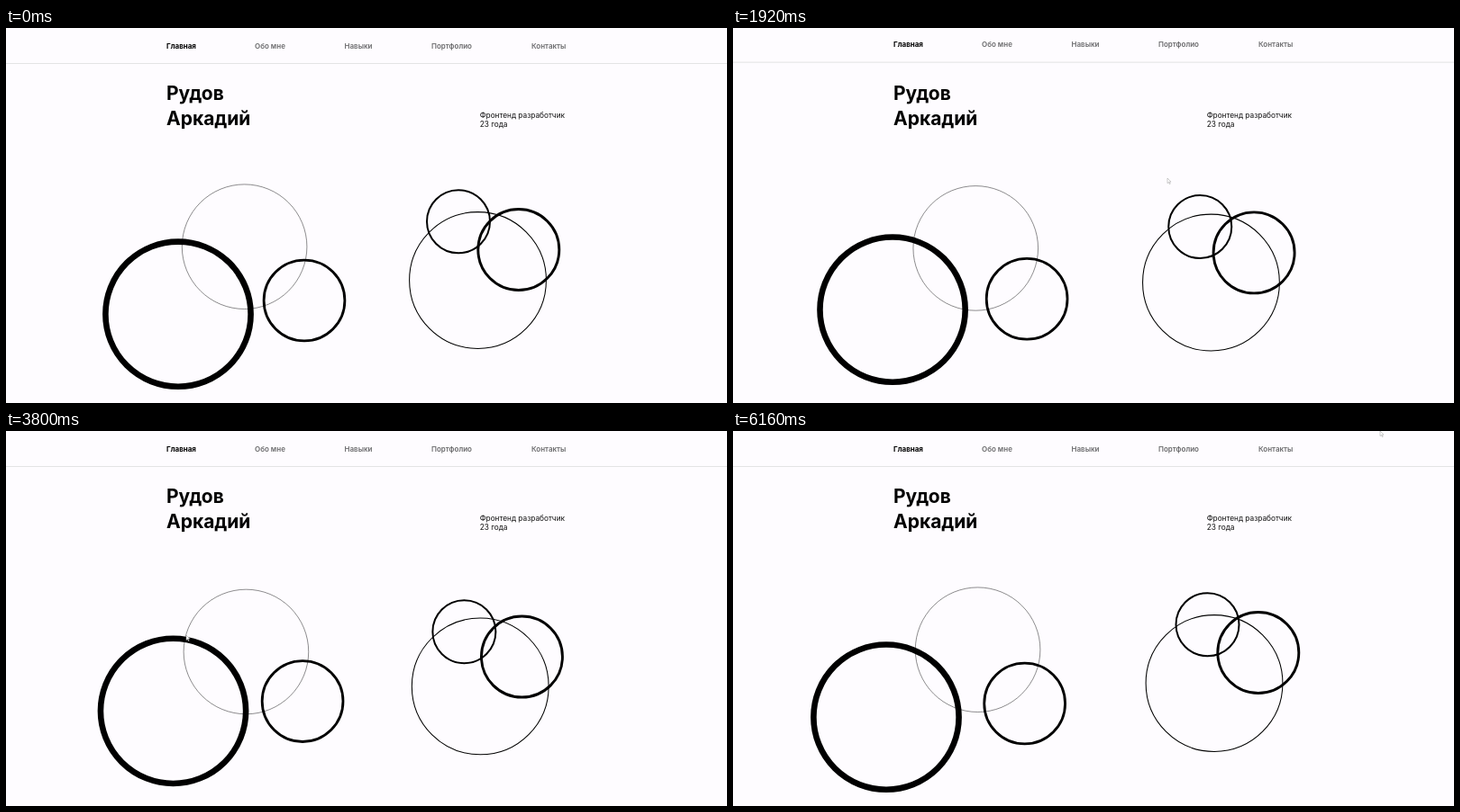
These frames come from a looping animation (800 by 417 pixels, 7.04 s). An HTML page:

```html
<!DOCTYPE html>
<html lang="ru">
<head>
<meta charset="utf-8">
<title>Портфолио</title>
<style>
  html, body { margin: 0; width: 100%; height: 100%; overflow: hidden; background: #fefcff; }
  svg { display: block; width: 100vw; height: 100vh; }
  text { font-family: Inter, "Open Sans", sans-serif; }
  .nav { font-size: 8px; font-weight: 600; fill: #6b6b6d; }
  .nav .active { font-weight: 700; fill: #000; }
  .name { font-size: 21px; font-weight: 700; }
  .role { font-size: 8.3px; fill: #111; }
  circle { fill: none; stroke: #000; }
</style>
</head>
<body>
<svg viewBox="0 0 800 417">
  <g id="header">
    <g class="nav">
      <text class="active" x="178" y="22.7">Главная</text>
      <text x="276" y="22.7">Обо мне</text>
      <text x="375.5" y="22.7">Навыки</text>
      <text x="472" y="22.7">Портфолио</text>
      <text x="583" y="22.7">Контакты</text>
    </g>
    <path id="rule" d="M0 39.5H800"/>
  </g>
  <g id="intro">
    <g class="name">
      <text x="178" y="79.5">Рудов</text>
      <text x="178" y="107.5">Аркадий</text>
    </g>
    <g class="role">
      <text x="525.7" y="100.2">Фронтенд разработчик</text>
      <text x="525.7" y="110.4">23 года</text>
    </g>
  </g>
  <!-- data-depth: how far a ring follows the pointer -->
  <g id="rings">
    <circle cx="264.6" cy="243.2" r="69.3" stroke-width=".45" data-depth=".01"/>
    <circle cx="191" cy="318.2" r="80.6" stroke-width="6.6" data-depth="-.03"/>
    <circle cx="331" cy="303" r="44.9" stroke-width="2.8" data-depth="-.0105"/>
    <circle cx="523.5" cy="280.5" r="75.9" stroke-width="1.05" data-depth=".015"/>
    <circle cx="502" cy="215.2" r="35" stroke-width="2" data-depth=".035"/>
    <circle cx="568.8" cy="246.5" r="45" stroke-width="2.9" data-depth=".02"/>
  </g>
  <path id="cursor" d="M0 0V5.6L1.4 4.4L2.4 6.6L3.2 6.2L2.2 4.1H4Z" fill="#fff" stroke="#999" stroke-width=".5"/>
</svg>
<script>
const LOOP = 7040, STEP = 40;
const ENTER = 200, REST_X = 18;
const byId = id => document.getElementById(id);
const [header, rule, intro, rings, cursor] =
  ['header', 'rule', 'intro', 'rings', 'cursor'].map(byId);

// pointer stops: time, x, y
const stops = [
  [ENTER, REST_X, 0], [1120, 158, 87], [1920, 482, 168], [2520, 353, 290],
  [3800, 200, 228], [4600, 391, 181], [6160, 718, 1]
];

const clamp = u => Math.min(1, Math.max(0, u));
const mix = (a, b, u) => a + (b - a) * u;

function smooth(from, to, t) {
  const u = clamp((t - from) / (to - from));
  return u * u * (3 - 2 * u);
}

// Eases between stops, with one loop on the way that widens with the time available.
function pointerAt(t) {
  const next = Math.max(1, stops.findIndex(stop => stop[0] > t));
  const [from, to] = t >= stops.at(-1)[0]
    ? stops.slice(-2)
    : [stops[next - 1], stops[next]];
  const span = to[0] - from[0];
  const u = smooth(from[0], to[0], t);
  const swing = span / 10 * Math.sin(Math.PI * u) ** 2;
  const angle = 2 * Math.PI * u;
  return [
    mix(from[1], to[1], u) - swing * Math.sin(angle),
    mix(from[2], to[2], u) + swing * Math.cos(angle)
  ];
}

function place(node, scale, dy) {
  node.setAttribute('transform', `translate(${400 * (1 - scale)} ${dy}) scale(${scale})`);
}

function render(t) {
  const leave = smooth(520, 880, t);
  const shrink = leave * (1 - smooth(1360, 1640, t));
  const hidden = leave * (1 - smooth(1640, 1960, t));
  const scale = 1 - 0.062 * shrink;
  const [px, py] = pointerAt(t);

  header.setAttribute('transform', `translate(0 ${-32 * hidden})`);
  rule.setAttribute('stroke', `rgb(${Array(3).fill(Math.round(mix(228, 184, hidden)))})`);
  place(intro, scale, -1.8 * shrink);
  place(rings, scale, 2.3 * shrink);
  for (const ring of rings.children) {
    const depth = ring.dataset.depth;
    ring.setAttribute('transform', `translate(${(px - REST_X) * depth} ${py * depth})`);
  }
  cursor.setAttribute('visibility', t < ENTER ? 'hidden' : 'visible');
  cursor.setAttribute('transform', `translate(${px} ${py - 1})`);
}

const start = performance.now();
function tick() {
  const t = (performance.now() - start) % LOOP;
  render(Math.floor(t / STEP) * STEP);
  requestAnimationFrame(tick);
}
tick();
</script>
</body>
</html>
```
